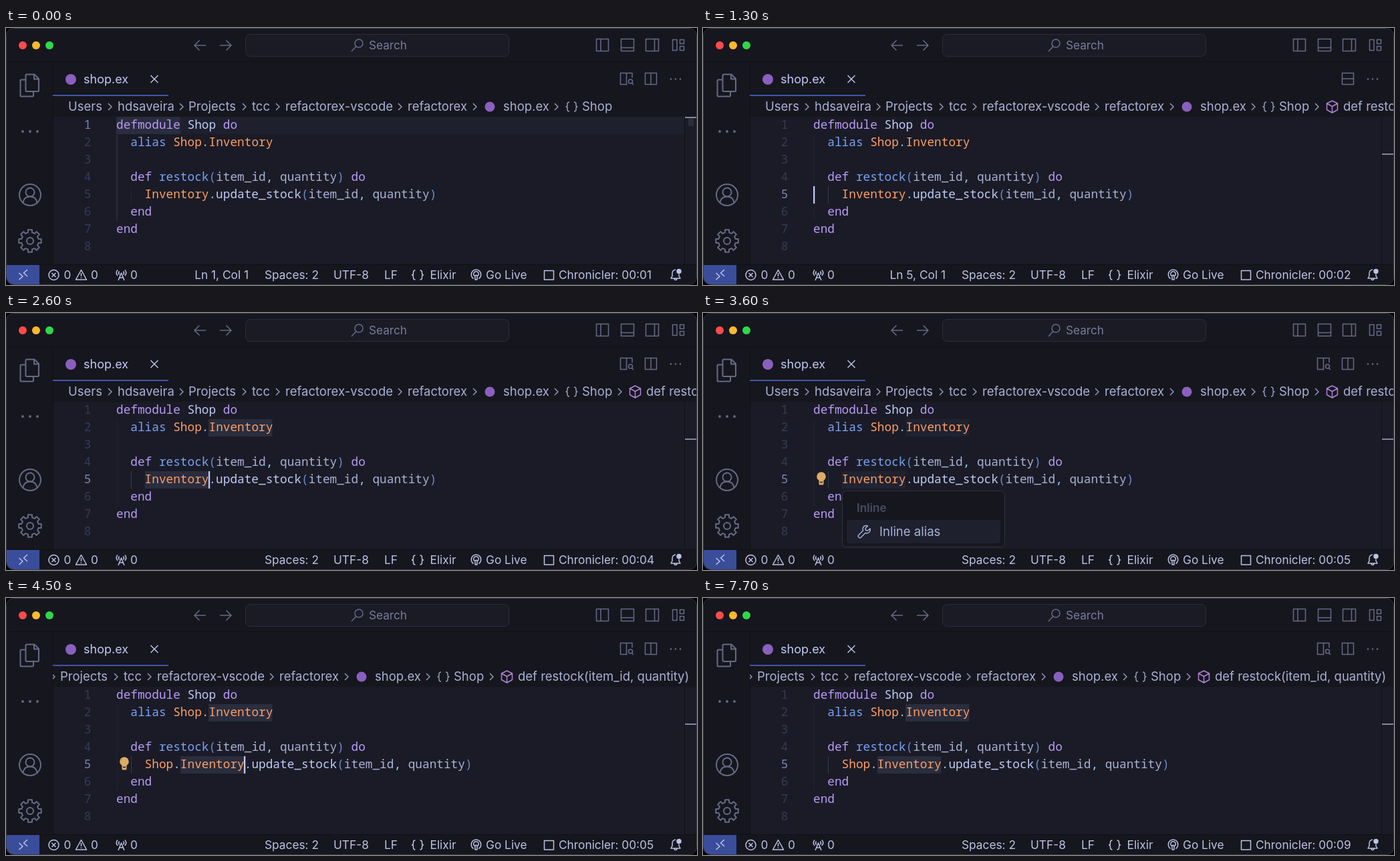
An HTML page for the animation above (7800 ms loop, 1034 by 385 pixels).

```html
<!DOCTYPE html>
<html lang="en">
<head>
<meta charset="utf-8">
<title>Inline alias</title>
<style>
  html, body { margin: 0; width: 100%; height: 100%; overflow: hidden; background: #000; }
  svg { display: block; width: 100%; height: 100%; }
  text { font: 18px Inter, "Open Sans", sans-serif; fill: #a9b1d6; }
  .crumbs text { font-size: 18.5px; }
  .code text { font: 500 17.75px "Noto Sans Mono", "DejaVu Sans Mono", monospace; }
  .status text { font-size: 17.3px; fill: #bcc3e6; }
  .icon { fill: none; stroke: #666a88; stroke-width: 1.5; stroke-linejoin: round; }
  .bright { stroke: #bcc3e6; }
  .soft { stroke: #9097ba; }
  .bold { stroke-width: 2; }
  .code .k { fill: #bb9af7; }
  .code .m { fill: #ff9e64; }
  .code .f { fill: #7aa2f7; }
  .code .w { fill: #c0caf5; }
  .code .o { fill: #89ddff; }
  .code .b { fill: #698cd6; }
  .code .num { fill: #363b54; text-anchor: end; }
  .code .num.now { fill: #7d84ad; }
</style>
</head>
<body>
<svg viewBox="0 0 1034 385">
  <defs>
    <clipPath id="win"><rect x="1" y="1" width="1032" height="383" rx="11"/></clipPath>
    <clipPath id="crumbClip"><rect x="70" y="102" width="963" height="31"/></clipPath>
    <path id="chev" d="M-3-5 2 0-3 5"/>
    <path id="braces" d="M5-7q-3 0-3 3v1.5q0 2.5-2 2.5 2 0 2 2.5v1.5q0 3 3 3M12-7q3 0 3 3v1.5q0 2.5 2 2.5-2 0-2 2.5v1.5q0 3-3 3"/>
  </defs>
  <g clip-path="url(#win)">
    <rect width="1034" height="385" fill="#16161e"/>
    <rect x="70" y="133" width="964" height="221" fill="#1a1b26"/>
    <path d="M0 50.5H1034M70.5 51V354M1015.5 133V354M0 354.5H1034" stroke="#101014" fill="none"/>

    <!-- title bar -->
    <circle cx="25" cy="26" r="6" fill="#ff4b4b"/>
    <circle cx="45" cy="26" r="6" fill="#feb82e"/>
    <circle cx="65" cy="26" r="6" fill="#2fd84a"/>
    <rect x="358.5" y="9.5" width="394" height="33" rx="7" fill="#1b1b26" stroke="#2b2d3b"/>
    <text x="543" y="32" style="font-size:17.2px;fill:#787c99">Search</text>
    <g class="icon">
      <path d="M299 26H282m7.5-7.5L282 26l7.5 7.5M320 26h17m-7.5-7.5L337 26l-7.5 7.5"/>
      <circle cx="528" cy="23" r="6"/><path d="M524 27.500 517 35"/>
      <path d="M883.5 16.500h18v18h-18zM890 16.500v18M920.5 16.500h19v18h-19zM920.5 29.500h19M957.5 16.500h19v18h-19zM970.5 16.500v18"/>
      <path d="M997.5 17.500h6.500v16h-6.500zM1008.5 17.500h6v6h-6zM1008.5 27.500h6v6h-6z"/>
    </g>

    <!-- activity bar -->
    <g class="icon bold">
      <path d="M29 77.500H23q-1.500 0-1.500 1.500V101q0 1.500 1.500 1.500H39.500q1.500 0 1.500-1.500V95"/>
      <path d="M31 69.500H42.500L49 76V93.500q0 1.500-1.500 1.500H31q-1.500 0-1.500-1.500V71q0-1.500 1.500-1.500zM42 69.500v7h7"/>
      <circle cx="36" cy="250" r="16"/><circle cx="36" cy="246" r="6.500"/>
      <path d="M25.500 261.500q1.500-9 10.500-9t10.500 9"/>
      <path id="gear" transform="translate(36 319)"/><circle cx="36" cy="319" r="5"/>
    </g>
    <g fill="#666a88">
      <circle cx="25" cy="155" r="1.900"/><circle cx="36" cy="155" r="1.900"/><circle cx="47" cy="155" r="1.900"/>
      <circle cx="995" cy="76.500" r="1.300"/><circle cx="1002" cy="76.500" r="1.300"/><circle cx="1009" cy="76.500" r="1.300"/>
    </g>

    <!-- tab row -->
    <circle cx="97" cy="77" r="8" fill="#8a60bf"/>
    <text x="116" y="83" style="fill:#c0caf5">shop.ex</text>
    <path class="icon bright" d="M216.500 71l11 11m0-11-11 11"/>
    <rect x="70" y="100" width="173" height="2" fill="#3f56a6"/>
    <g class="icon">
      <path d="M956.500 67.500h17v17h-17z"/>
      <g id="plainTools">
        <path d="M965 67.500v17M928.500 67.500v17M937 74.500V67.500H919.500V84.500H929.500M936.500 82.500l2.500 2.500"/>
        <circle cx="934.500" cy="80" r="3"/>
      </g>
      <path id="altTool" d="M956.500 76h17"/>
    </g>

    <!-- breadcrumbs -->
    <g clip-path="url(#crumbClip)">
      <g id="crumbs" class="crumbs">
        <text x="93" y="124">Users</text>
        <text x="167" y="124">hdsaveira</text>
        <text x="273" y="124">Projects</text>
        <text x="368" y="124">tcc</text>
        <text x="418" y="124">refactorex-vscode</text>
        <text x="601" y="124">refactorex</text>
        <circle cx="724" cy="118" r="7.500" fill="#8a60bf"/>
        <text x="744" y="124">shop.ex</text>
        <text x="862" y="124">Shop</text>
        <g class="icon soft" id="chevs">
          <use href="#braces" x="838" y="118"/>
        </g>
        <g id="method">
          <use href="#chev" x="919" y="118" class="icon soft"/>
          <path class="icon" style="stroke:#b180d7" d="M941.500 109l8 4v9.500l-8 4.500-8-4.500V113zM933.500 113l8 4.500 8-4.500M941.500 117.500v9.500"/>
          <text x="958" y="124">def restock(item_id, quantity)</text>
        </g>
      </g>
    </g>

    <!-- editor -->
    <rect id="band" x="165" y="133" width="850" height="26" fill="#1e202e"/>
    <path id="outer" d="M166 159V289"/>
    <path id="inner" d="M187.500 237V263"/>
    <g fill="#292d3e">
      <rect id="hiTop" x="165" y="133" width="95.500" height="26"/>
      <g id="hiName">
        <rect x="303" y="159" width="95.500" height="26"/>
        <rect id="hiUse" y="237" width="95.500" height="26"/>
      </g>
    </g>
    <g class="code" id="code">
      <text x="165" y="151"><tspan class="k">defmodule</tspan> <tspan class="w">Shop</tspan> <tspan class="k">do</tspan></text>
      <text x="186.300" y="177"><tspan class="f">alias</tspan> <tspan class="m">Shop</tspan><tspan class="o">.</tspan><tspan class="m">Inventory</tspan></text>
      <text x="186.300" y="229"><tspan class="k">def</tspan> <tspan class="f">restock</tspan><tspan class="b">(</tspan>item_id<tspan class="o">,</tspan> quantity<tspan class="b">)</tspan> <tspan class="k">do</tspan></text>
      <text x="207.600" y="255"><tspan id="prefix"><tspan class="m">Shop</tspan><tspan class="o">.</tspan></tspan><tspan class="m">Inventory</tspan><tspan class="o">.</tspan><tspan class="w">update_stock</tspan><tspan class="b">(</tspan>item_id<tspan class="o">,</tspan> quantity<tspan class="b">)</tspan></text>
      <text x="186.300" y="281" class="k">end</text>
      <text x="165" y="307" class="k">end</text>
    </g>
    <rect id="cursor" width="2.300" height="26" fill="#c0caf5"/>
    <g fill="#2a2c3b">
      <rect id="markTop" x="1021" y="134" width="8" height="13"/>
      <path id="markName" d="M1021 147h8v13h-8zM1021 189h8v14h-8z"/>
    </g>
    <rect id="ruler" x="1016" width="18" height="2" fill="#83879f"/>
    <g id="bulb" fill="#dcab68">
      <circle cx="177" cy="245" r="6.800"/>
      <path d="M173.500 249h7v7q0 1.500-1.500 1.500h-4q-1.500 0-1.500-1.500z"/>
      <path d="M175 253.500h4" stroke="#1a1b26" stroke-width="1.300"/>
    </g>
    <g id="menu">
      <rect x="208.500" y="266.500" width="243" height="84" rx="6" fill="#16161e" stroke="#30323f"/>
      <rect x="215" y="310" width="230" height="35" rx="4" fill="#1e202e"/>
      <text x="230" y="298" style="font-size:17px;font-weight:600;fill:#474b64">Inline</text>
      <text x="264" y="334" style="font-size:18.500px">Inline alias</text>
      <path class="icon" style="stroke:#a9b1d6" d="M246.500 319q-5-1.500-7 2.500-1 2 0 4.500l-7 7q-1 1.500.5 3t3 .5l7-7q3 1 5-.5 3-2 2-6l-3.500 3-3-.5-.5-3z"/>
    </g>

    <!-- status bar -->
    <g class="status">
      <rect y="355" width="50" height="30" fill="#3a4d9a"/>
      <g class="icon bright">
        <path d="M19.500 367l5.500 5-5.500 5M32 362l-5.500 5 5.500 5"/>
        <circle cx="71.500" cy="370" r="7.500"/><path d="M68.500 367l6 6m0-6-6 6"/>
        <path d="M112.500 362.500l8 14.500h-16zM112.500 367v5m0 1.500v1.500"/>
        <path d="M168 378l4.500-11 4.500 11M170 374h5M167 362.500q-3.500 4 0 8.500M178 362.500q3.500 4 0 8.500M169.500 364.500q-2 2.500 0 5M175.500 364.500q2 2.500 0 5"/>
        <use href="#braces" x="607.500" y="370"/>
        <path d="M699.500 375.500a7.300 7.300 0 1 1 8 0M701 371.500a3.800 3.800 0 1 1 5 0M702 370.500h3v6.500h-3z"/>
        <rect x="805.500" y="363.500" width="14" height="13.500"/>
        <g transform="translate(-2)">
          <path d="M1004 362q-5 .5-5 6v3.500l-2 3.500h14l-2-3.500v-3M1002 375q0 2.500 2 2.500t2-2.500"/>
          <circle cx="1009" cy="364.500" r="3" fill="#bcc3e6"/>
        </g>
      </g>
      <text x="86.500" y="376">0</text>
      <text x="127" y="376">0</text>
      <text x="186" y="376">0</text>
      <text id="pos" x="363" y="376" text-anchor="end"></text>
      <text x="387" y="376">Spaces: 2</text>
      <text x="490" y="376">UTF-8</text>
      <text x="566" y="376">LF</text>
      <text x="634.500" y="376">Elixir</text>
      <text x="718" y="376">Go Live</text>
      <text id="timer" x="827" y="376"></text>
    </g>
  </g>
  <rect x=".5" y=".5" width="1033" height="384" rx="11" fill="none" stroke="#3b3b45"/>
</svg>
<script>
const LOOP = 7800, LINE = 26, CHAR = 10.61;
const $ = id => document.getElementById(id);
const SVG = "http://www.w3.org/2000/svg";
const set = (id, attrs) => { for (const k in attrs) $(id).setAttribute(k, attrs[k]); };
const show = (id, on) => { $(id).style.display = on ? "" : "none"; };
const add = (parent, tag, attrs) => {
  const el = parent.appendChild(document.createElementNS(SVG, tag));
  for (const k in attrs) el.setAttribute(k, attrs[k]);
  return el;
};

const teeth = [];
for (let deg = 0; deg < 360; deg += 45)
  for (const [turn, r] of [[-10, 17], [10, 17], [14, 13], [31, 13]]) {
    const a = (deg + turn) * Math.PI / 180;
    teeth.push((r * Math.cos(a)).toFixed(1) + " " + (r * Math.sin(a)).toFixed(1));
  }
set("gear", { d: "M" + teeth.join("L") + "z" });

for (const x of [156, 263, 357, 407, 590, 702, 824])
  add($("chevs"), "use", { href: "#chev", x, y: 118 });

const nums = Array.from({ length: 8 }, (_, i) => {
  const el = add($("code"), "text", { x: 127.5, y: 151 + i * LINE });
  el.textContent = i + 1;
  return el;
});

// Last value whose start time has passed: time, value, time, value, ...
const step = (t, ...list) => {
  let value;
  for (let i = 0; i < list.length && t >= list[i]; i += 2) value = list[i + 1];
  return value;
};
const blink = (t, start) => Math.floor((t - start) / 500) % 2 === 0;

function render(t) {
  const row = step(t, 0, 1, 200, 2, 400, 3, 700, 4, 900, 5);
  const col = step(t, 0, 1, 1400, 14, 4300, 19);
  const edited = t >= 4300;
  const alt = t >= 1200 && t < 1800;
  const deep = row === 4 || row === 5;

  nums.forEach((el, i) => el.setAttribute("class", i + 1 === row ? "num now" : "num"));
  set("outer", { stroke: deep ? "#232534" : "#363b54" });
  set("inner", { stroke: deep ? "#363b54" : "#232534" });
  set("ruler", { y: 133 + (row - 1) * 13.75 });
  set("cursor", { x: 165 + (col - 1) * CHAR, y: 133 + (row - 1) * LINE });
  show("cursor", t < 1400 ? t >= 100 : t < 3300 ? blink(t, 1400) : t >= 4200 && blink(t, 4200));

  show("band", row === 1);
  show("hiTop", row === 1);
  show("markTop", row === 1);
  show("hiName", t >= 1700);
  show("markName", t >= 1700 && t < 2500);
  set("hiName", { opacity: t >= 3200 && t < 4400 ? 0.45 : 1 });
  set("hiUse", { x: edited ? 260.8 : 207.8 });

  show("prefix", edited);
  show("bulb", t >= 3200 && t < 4600);
  show("menu", t >= 3300 && t < 4200);
  show("plainTools", !alt);
  show("altTool", alt);
  show("method", t >= 1000);
  set("crumbs", { transform: `translate(${t >= 4400 ? -192 : 0})` });

  $("pos").textContent = t < 2500 ? `Ln ${row}, Col ${col}` : "";
  $("timer").textContent = "Chronicler: 00:0" + Math.floor((t + 1400) / 1000);
}

function frame() {
  render(performance.now() % LOOP);
  requestAnimationFrame(frame);
}
frame();
</script>
</body>
</html>
```
